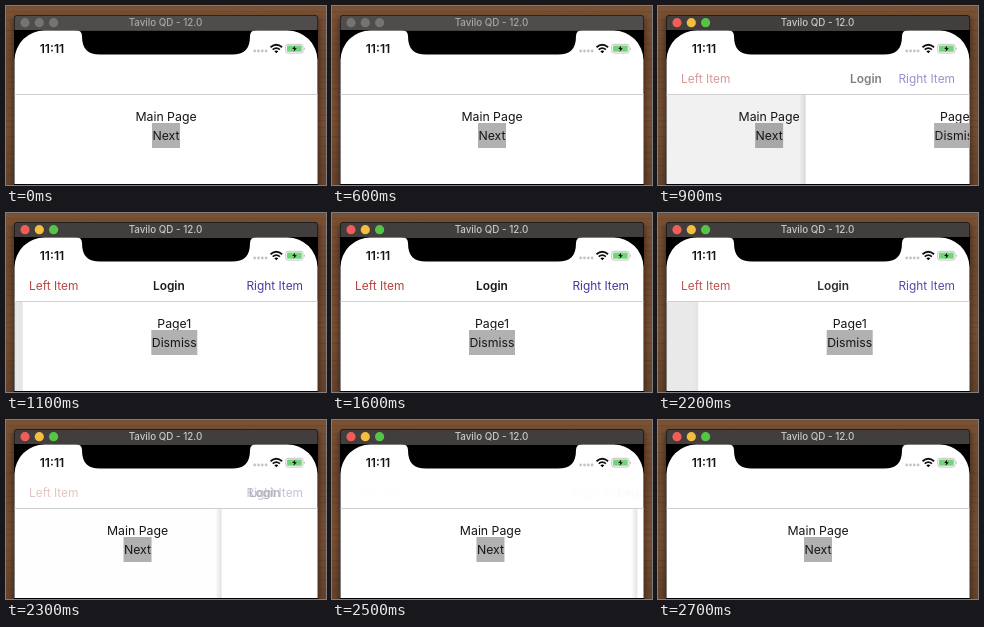
Recreate the animation shown at these times as an HTML page. Size 320 by 179 pixels, loop 3.3 s.

```html
<!DOCTYPE html>
<html lang="en">
<head>
<meta charset="utf-8">
<title>Page transition</title>
<style>
html, body { margin: 0; width: 100%; height: 100%; overflow: hidden; background: #6b4a32; }
svg { display: block; width: 100%; height: 100%; }
text { font-family: Inter, Roboto, sans-serif; font-size: 12.3px; fill: #161616; }
#nav text { font-size: 11.9px; }
.mid { text-anchor: middle; }
.end { text-anchor: end; }
.bold { font-weight: 600; }
</style>
</head>
<body>
<svg viewBox="0 0 320 179" preserveAspectRatio="none">
  <defs>
    <linearGradient id="wood" x2="0" y2="1">
      <stop offset="0" stop-color="#7a5235"/>
      <stop offset=".3" stop-color="#70492f"/>
      <stop offset=".65" stop-color="#785033"/>
      <stop offset="1" stop-color="#67442c"/>
    </linearGradient>
    <linearGradient id="edge">
      <stop offset="0" stop-color="#000" stop-opacity="0"/>
      <stop offset="1" stop-color="#000" stop-opacity=".12"/>
    </linearGradient>
    <filter id="soft" x="-10%" y="-10%" width="120%" height="120%">
      <feGaussianBlur stdDeviation="3"/>
    </filter>
    <clipPath id="screen">
      <path d="M8.5 178V54A30 30 0 0 1 38.500 24.500H281.500A30 30 0 0 1 311.500 54V178Z"/>
    </clipPath>
    <clipPath id="content"><rect x="8.500" y="88" width="303" height="90"/></clipPath>
  </defs>

  <rect width="320" height="179" fill="url(#wood)"/>
  <g id="grain" fill="none" stroke="#492814" stroke-width=".7"/>
  <rect x="7" y="12" width="306" height="180" opacity=".45" filter="url(#soft)"/>

  <path d="M8 179V13Q8 9 12 9H308Q312 9 312 13V179Z"/>
  <path id="bar" d="M8.500 24V13Q8.500 9.500 12 9.500H308Q311.500 9.500 311.500 13V24Z"/>
  <g id="lights">
    <circle cx="19" cy="16.700" r="4.600"/>
    <circle cx="33.300" cy="16.700" r="4.600"/>
    <circle cx="47.600" cy="16.700" r="4.600"/>
  </g>
  <text id="title" class="mid" x="159.500" y="20.400" style="font-size:9.800px;font-weight:500">Tavilo QD - 12.0</text>

  <g clip-path="url(#screen)">
    <rect x="8" y="24" width="304" height="155" fill="#fff"/>
    <g clip-path="url(#content)">
      <g id="main">
        <text class="mid" x="160" y="115">Main Page</text>
        <rect x="146" y="117" width="28" height="25" fill="#b1b1b1"/>
        <text class="mid" x="160" y="134">Next</text>
      </g>
      <rect id="dim" x="8" y="88" width="304" height="91"/>
      <g id="page">
        <rect id="shade" x="2" y="88" width="7" height="91" fill="url(#edge)"/>
        <rect x="8.500" y="88" width="303" height="91" fill="#fff"/>
        <text class="mid" x="160" y="115">Page1</text>
        <rect x="137" y="117" width="46" height="25" fill="#b1b1b1"/>
        <text class="mid" x="160" y="134">Dismiss</text>
      </g>
    </g>
    <rect x="8" y="88" width="304" height="1" fill="#d0d0d0"/>

    <g id="nav">
      <text x="23" y="77" style="fill:#b3403e">Left Item</text>
      <text class="end" x="297" y="77" style="fill:#41379f">Right Item</text>
      <text id="login" class="mid bold" x="160" y="77">Login</text>
    </g>

    <path d="M69 24Q76 24 76 30C76 43.500 82 48.600 94 48.600H226C238 48.600 244 43.500 244 30Q244 24 251 24Z"/>
    <text class="bold" x="33.700" y="46.700" style="font-size:12.200px">11:11</text>
    <g fill="#c4c4c4">
      <circle cx="248.700" cy="45" r="1.400"/>
      <circle cx="252.500" cy="45" r="1.400"/>
      <circle cx="256.300" cy="45" r="1.400"/>
      <circle cx="260.100" cy="45" r="1.400"/>
    </g>
    <g fill="none" stroke="#111" stroke-width="1.800">
      <path d="M264.500 41.300Q270.300 36.300 276.100 41.300"/>
      <path d="M266.700 43.700Q270.300 40.500 273.900 43.700"/>
    </g>
    <path d="M268.300 45.200Q270.300 43.600 272.300 45.200L270.300 47.300Z"/>
    <rect x="279.700" y="38.300" width="17.400" height="8.800" rx="2.300" fill="#fff" stroke="#b5b5b5" stroke-width=".8"/>
    <rect x="281" y="39.600" width="14.800" height="6.200" rx="1.200" fill="#70d679"/>
    <path d="M298 41.200Q299.600 42.700 298 44.300Z" fill="#a5a5a5"/>
    <path d="M289.200 39.800L286.200 43.100H288.200L287.500 45.700L290.800 42.200H288.700Z"/>
  </g>
</svg>
<script>
const LOOP = 3300, STEP = 100, WIDTH = 302;
const PUSH = 801, POP = 2170, ACTIVE = 700;
const $ = id => document.getElementById(id);
const set = (id, name, value) => $(id).setAttribute(name, value);
const shift = (id, x) => set(id, 'transform', `translate(${x.toFixed(2)} 0)`);

// Critically damped spring, running from 1 to 0.
function spring(ms) {
  const x = Math.sqrt(1000 / 3) * Math.max(0, ms) / 1000;
  return (1 + x) * Math.exp(-x);
}

function drawGrain() {
  let d = '';
  for (let i = 0; i < 24; i++) {
    const y = i * 7.7 + 2 * Math.sin(i * 5);
    d += `M0 ${y.toFixed(1)}q80 ${(3 * Math.sin(i * 3)).toFixed(1)} 160 0t160 0`;
  }
  $('grain').innerHTML = `<path d="${d}" opacity=".3"/>`;
}

function drawWindow(active) {
  set('bar', 'fill', active ? '#433e3e' : '#504c4b');
  $('title').style.fill = active ? '#c9c7c6' : '#aaa6a4';
  const colors = active ? ['#f25e57', '#f4bd3e', '#55c546'] : ['#777371', '#777371', '#777371'];
  [...$('lights').children].forEach((dot, i) => dot.setAttribute('fill', colors[i]));
}

function render(t) {
  const popping = t >= POP;
  let shown = popping ? spring(t - POP) : 1 - spring(t - PUSH);
  if (t >= 2700) shown = 0;
  const rest = 1 - shown;
  shift('main', -0.3 * WIDTH * shown);
  shift('page', WIDTH * rest);
  shift('login', WIDTH * rest * (popping ? 0.476 : 0.345));
  // The dimming clears early on the way back.
  set('dim', 'opacity', 0.1 * (popping ? Math.max(0, 1 - 1.4 * rest) : shown));
  set('shade', 'opacity', shown > 0 ? Math.min(1, 2 * rest) : 0);
  set('nav', 'opacity', shown);
  drawWindow(t >= ACTIVE);
}

function tick() {
  const t = performance.now() % LOOP;
  render(Math.floor(t / STEP) * STEP);
  requestAnimationFrame(tick);
}

drawGrain();
tick();
</script>
</body>
</html>
```
